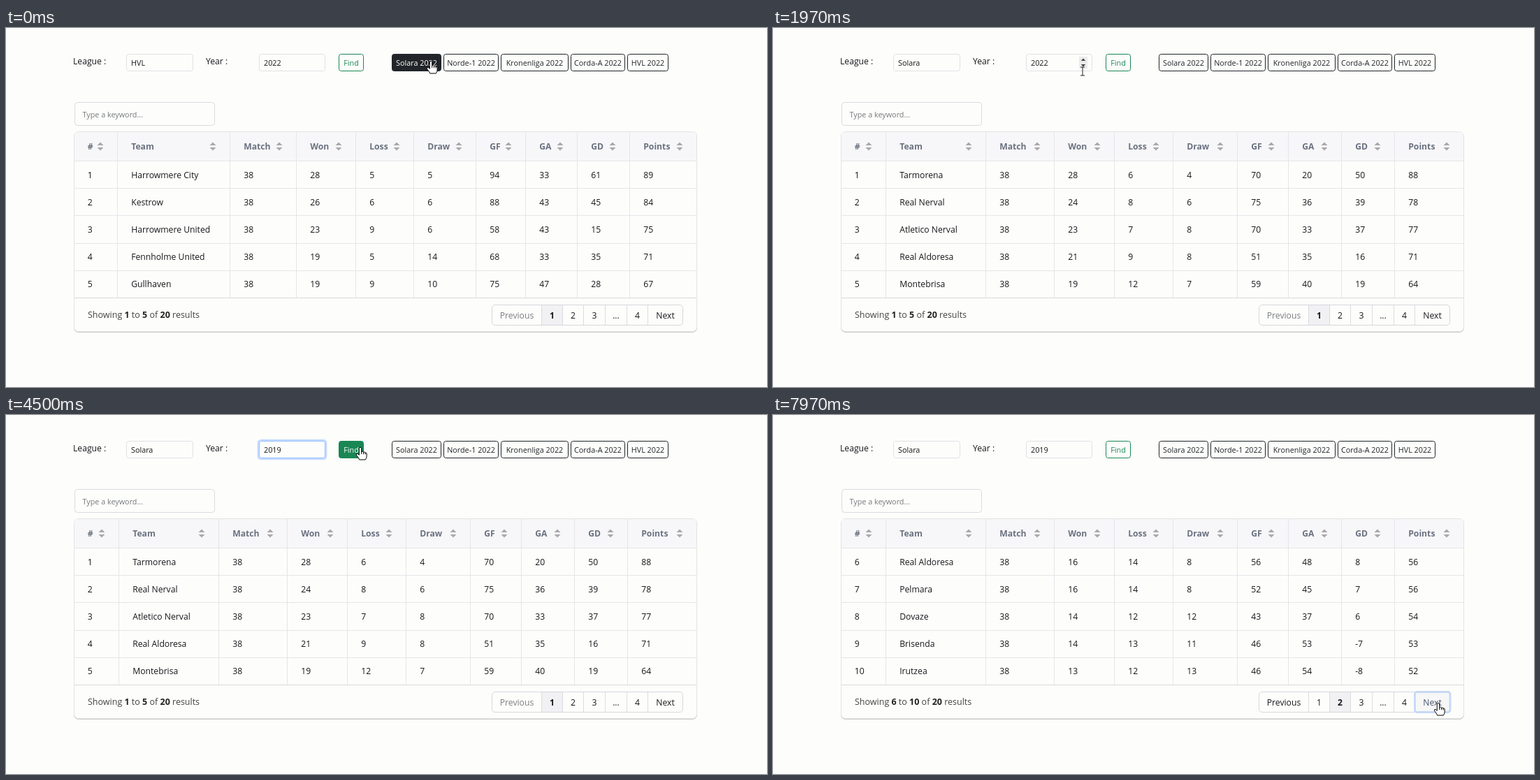
These frames come from a looping animation (1089 by 514 pixels, 8000 ms). An HTML page:

```html
<!DOCTYPE html>
<html lang="en">
<head>
<meta charset="utf-8">
<title>League table</title>
<style>
html, body { margin: 0; width: 1089px; height: 514px; overflow: hidden; background: #fdfdfb; }
svg { display: block; font: 12.2px "Open Sans", "Noto Sans", sans-serif; fill: #16181b; }
.small { font-size: 10.8px; }
.note { font-size: 12.5px; }
.bold { font-weight: 700; }
.mid { text-anchor: middle; }
.card { filter: drop-shadow(0 1px .5px rgba(0, 0, 0, .2)); }
</style>
</head>
<body>
<svg id="stage" width="1089" height="514"></svg>
<script>
const LOOP = 8000;
const FIND_CLICK = 4650, PAGE_CLICK = 6900;
const YEAR_CLICKS = [2650, 3100, 3550];
const PAPER = '#fdfdfb', DARK = '#212529', GREEN = '#198754', LINE = '#e6e6ea';

// Each row: team, won, lost, goals for, goals against
const islandTable = [
  ['Harrowmere City', 28, 5, 94, 33],
  ['Kestrow', 26, 6, 88, 43],
  ['Harrowmere United', 23, 9, 58, 43],
  ['Fennholme United', 19, 5, 68, 33],
  ['Gullhaven', 19, 9, 75, 47]
];
const southTable = [
  ['Tarmorena', 28, 6, 70, 20],
  ['Real Nerval', 24, 8, 75, 36],
  ['Atletico Nerval', 23, 7, 70, 33],
  ['Real Aldoresa', 21, 9, 51, 35],
  ['Montebrisa', 19, 12, 59, 40]
];
const olderTable = [
  ['Real Nerval', 26, 3, 70, 25],
  ['Tarmorena', 25, 6, 86, 38],
  ['Atletico Nerval', 18, 4, 51, 27],
  ['Lorvela', 19, 6, 54, 34],
  ['Montebrisa', 18, 14, 63, 49],
  ['Real Aldoresa', 16, 14, 56, 48],
  ['Pelmara', 16, 14, 52, 45],
  ['Dovaze', 14, 12, 43, 37],
  ['Brisenda', 14, 13, 46, 53],
  ['Irutzea', 13, 12, 46, 54]
];

const heads = ['#', 'Team', 'Match', 'Won', 'Loss', 'Draw', 'GF', 'GA', 'GD', 'Points'];
const islandCols = [97, 159.5, 320.5, 415.5, 500.5, 583.5, 672.5, 743.5, 817.5, 892.5, 988.5];
const southCols = [97, 161.5, 304.5, 402.5, 488.5, 572.5, 664.5, 737.5, 813.5, 889.5, 988.5];

const shortcuts = [
  ['Solara 2022', 552.5, 70], ['Norde-1 2022', 626.5, 78], ['Kronenliga 2022', 708.5, 96],
  ['Corda-A 2022', 808.5, 77], ['HVL 2022', 889.5, 58]
];
const pageEdges = [695.5, 766.5, 796.5, 826.5, 857.5, 888.5, 918.5, 968.5];
const pageLabels = ['Previous', '1', '2', '3', '...', '4', 'Next'];

// Pointer hot spot: time, x, y
const path = [
  [0, 608, 47], [730, 608, 47], [1370, 517, 60], [1570, 517, 60], [1770, 482, 72],
  [1970, 443, 62], [2060, 443, 62], [2350, 447, 51], [3750, 447, 51], [4300, 507, 46],
  [4900, 507, 46], [5370, 881, 342], [5950, 952, 412], [LOOP, 952, 412]
];

const pointers = {
  arrow: '<path d="M0 0V14.2L3.2 11.2 5.6 16.8 8 15.7 5.6 10.2H10Z" fill="#fff" stroke="#000"/>',
  hand: '<path d="M-1.7 1.3Q0-.8 1.7 1.3V6.5Q4 5.6 4.6 7.2Q6.6 6.4 7.2 8Q9 7.6 9.2 9.3V13Q9 16 7.3 18H-1.3Q-2.5 15-5.5 11.5Q-6.2 9.3-4 9.3L-1.7 11.3Z' +
    'M1.7 6.5V10M4.6 7.2V10.2M7.2 8V10.5" fill="#fff" stroke="#000"/>',
  beam: '<path d="M-3-6H3M0-6V6M-3 6H3" fill="none" stroke="#222"/>'
};

const text = (x, y, s, cls = '', fill = '') =>
  `<text x="${x}" y="${y}" class="${cls}"${fill && ` fill="${fill}"`}>${s}</text>`;
const box = (x, y, w, h, r, fill, stroke = 'none', more = '') =>
  `<rect x="${x}" y="${y}" width="${w}" height="${h}" rx="${r}" fill="${fill}" stroke="${stroke}" ${more}/>`;
const line = (d, stroke = LINE) => `<path d="${d}" fill="none" stroke="${stroke}"/>`;
const inside = (p, x, y, w, h) => p.x >= x && p.x <= x + w && p.y >= y && p.y <= y + h;

function pointerAt(t) {
  const i = path.findIndex(k => k[0] > t);
  const [t0, x0, y0] = path[i - 1], [t1, x1, y1] = path[i];
  const k = (t - t0) / (t1 - t0), e = k * k * (3 - 2 * k);
  return { x: x0 + (x1 - x0) * e, y: y0 + (y1 - y0) * e };
}

function button(label, x, w, color, hover) {
  return box(x, 37.5, w, 24, 3, hover ? color : 'none', color) +
    text(x + w / 2, 54, label, 'small mid', hover ? '#fff' : color);
}

function yearField(t, hover, onSpin) {
  const clicks = YEAR_CLICKS.filter(c => c <= t);
  const last = clicks[clicks.length - 1];
  const focused = clicks.length && t < FIND_CLICK;
  let s = box(362.5, 37.5, 94, 24, 3, PAPER, focused ? '#86b7fe' : '#dfe2e6');
  if (focused) s += box(361, 36, 97, 27, 4, 'none', '#c3daff', 'stroke-width="2.6"');
  s += text(369, 54, 2022 - clicks.length, 'small');
  if (focused && (t - last) % 1000 < 500) s += line('M394.5 42V57', '#000');
  if (hover) {
    s += box(438, 41, 12, 17, 0, '#ececec');
    if (onSpin) s += box(438, 49, 12, 8.5, 0, t - last < 120 ? '#999' : '#cfcfcf');
    s += '<path d="M440.8 47L444 43.5 447.2 47ZM440.8 52L444 55.5 447.2 52Z" fill="#444"/>';
  }
  return s;
}

function table(rows, cols, first) {
  let s = box(97.5, 148.5, 891, 286, 6, PAPER, '#e4e4e4', 'class="card"') +
    '<path d="M98 190V154.500Q98 149 103 149H982.500Q988 149 988 154.500V190Z" fill="#f7f7f9"/>';
  heads.forEach((h, c) => {
    const ix = cols[c + 1] - 24.5;
    s += text(cols[c] + 19.7, 174, h, 'bold', '#6b7280') +
      `<path d="M${ix - 4.5} 168L${ix} 163.500 ${ix + 4.5} 168ZM${ix - 4.5} 171L${ix} 175.500 ${ix + 4.5} 171Z" fill="#a9a9ac"/>`;
    if (c) s += line(`M${cols[c]} 149V386`);
  });
  rows.forEach(([team, won, lost, gf, ga], r) => {
    const y = 190.5 + r * 39.2, draw = 38 - won - lost;
    const cells = [first + r, team, 38, won, lost, draw, gf, ga, gf - ga, won * 3 + draw];
    s += line(`M98 ${Math.floor(y) + .5}H988`);
    cells.forEach((v, c) => s += text(cols[c] + 19.7, Math.round(y + 24), v));
  });
  return s + line('M98 386.500H988', '#d9dadd');
}

function footer(first, page, nextHover, nextFocus) {
  const b = v => `<tspan class="bold" fill="#222">${v}</tspan>`;
  let s = text(117, 415, `Showing ${b(first)} to ${b(first + 4)} of ${b(20)} results`, 'note', '#444');
  pageLabels.forEach((label, i) => {
    const x = pageEdges[i], w = pageEdges[i + 1] - x;
    const current = i === page, over = i === 6 && nextHover;
    if (current || over) s += box(x, 397, w, 28, over ? 4 : 0, current ? '#f1f1f3' : '#f7f7f7');
    if (i) s += line(`M${x} 397V425`, '#dadce0');
    const fill = over ? '#46506a' : i === 0 && page === 1 ? '#7a7d82' : '';
    s += text(x + w / 2, 415.5, label, current ? 'mid bold' : 'mid', fill);
  });
  s += box(695.5, 396.5, 273, 29, 4.5, 'none', '#d5d7dc');
  if (nextFocus) s += box(918.5, 396.5, 50.5, 29, 3, 'none', '#c6d8f5', 'stroke-width="2.8"');
  return s;
}

function scene(t) {
  const p = pointerAt(t);
  const overYear = inside(p, 362, 37, 95, 25.5), onSpin = inside(p, 438, 41, 12, 17);
  const overFind = inside(p, 476, 37, 36, 25), overNext = inside(p, 918, 396, 51, 30);
  const overShortcut = shortcuts.findIndex(([, x, w]) => inside(p, x, 37, w, 25));
  const page = t < PAGE_CLICK ? 1 : 2, first = page * 5 - 4;
  const data = t < 370 ? islandTable : t < 4950 ? southTable : olderTable;

  let s = text(96, 51.5, 'League :') + text(286, 51.5, 'Year :') +
    box(172.5, 37.5, 95, 24, 3, PAPER, '#dfe2e6') +
    text(179, 54, t < 100 ? 'HVL' : 'Solara', 'small') +
    yearField(t, overYear, onSpin) +
    button('Find', 476.5, 35, GREEN, overFind);
  shortcuts.forEach(([label, x, w], i) => s += button(label, x, w, DARK, i === overShortcut));
  s += box(98.5, 106.5, 200, 33, 4, PAPER, '#d9dbe0') +
    text(109.5, 127.6, 'Type a keyword...', 'small', '#777a7e') +
    table(data.slice(first - 1, first + 4), t < 370 ? islandCols : southCols, first) +
    footer(first, page, overNext, t >= PAGE_CLICK);

  const onButton = overFind || overNext || overShortcut >= 0;
  const kind = onButton ? 'hand' : overYear && !onSpin ? 'beam' : 'arrow';
  return s + `<g transform="translate(${p.x.toFixed(1)} ${p.y.toFixed(1)})">${pointers[kind]}</g>`;
}

const stage = document.getElementById('stage');
let shown = '';
function frame() {
  const next = scene(performance.now() % LOOP);
  if (next !== shown) stage.innerHTML = shown = next;
  requestAnimationFrame(frame);
}
frame();
</script>
</body>
</html>
```
